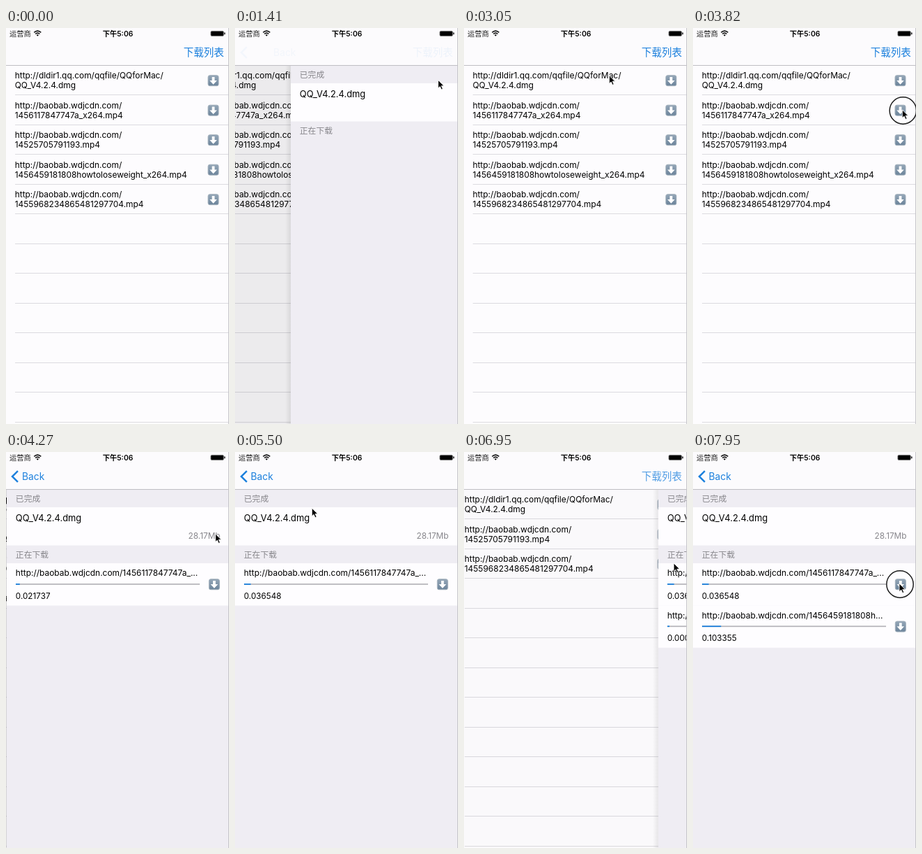
Animation of 320 by 566 pixels, one loop 8 s. Source, as an HTML page:

```html
<!DOCTYPE html>
<html lang="zh">
<head>
<meta charset="utf-8">
<style>
  html, body { margin: 0; width: 100%; height: 100%; overflow: hidden; background: #fdfcfe; }
  svg { display: block; width: 100vw; height: 100vh; }
  text { font-family: Inter, "Noto Sans CJK SC", "Noto Sans CJK", sans-serif; white-space: pre; }
</style>
</head>
<body>
<svg viewBox="0 0 320 566" preserveAspectRatio="none">
  <defs>
    <linearGradient id="shade"><stop offset="0" stop-opacity="0"/><stop offset="1" stop-opacity=".08"/></linearGradient>
    <linearGradient id="key" x2="0" y2="1"><stop offset="0" stop-color="#94a6b7"/><stop offset="1" stop-color="#6c849b"/></linearGradient>
    <g id="icon">
      <rect x="-7.5" y="-7.5" width="15" height="15" rx="2.5" fill="url(#key)" stroke="#a3b0bc" stroke-width="1"/>
      <path d="M-1.9-5.2h3.8v4.9h3.4L0 5.6-5.3-.3h3.4z" fill="#fff"/>
    </g>
  </defs>
  <rect width="320" height="566" fill="#fdfcfe"/>
  <g id="list"></g>
  <rect id="dim" y="53" width="320" height="513"/>
  <g id="page">
    <rect id="shadow" x="-8" y="53" width="8" height="513" fill="url(#shade)"/>
    <rect y="53" width="320" height="513" fill="#efedf3"/>
    <rect y="79" width="320" height="54.5" fill="#fefdff"/>
    <g id="cells"></g>
  </g>
  <rect width="320" height="53" fill="#fcfbfd"/>
  <rect y="53" width="320" height="1" fill="#bfbec3"/>
  <g id="nav" fill="#1c80dd">
    <text id="listButton" x="254.7" y="40.3" font-size="14.5">下载列表</text>
    <path id="chevron" d="M17 27.2 9 35l8 7.8" fill="none" stroke="#1c80dd" stroke-width="2.5"/>
    <text id="back" x="22.6" y="40" font-size="13.8">Back</text>
  </g>
  <g id="status">
    <text x="5" y="11.8" font-size="10.3" fill="#222">运营商</text>
    <g fill="none" stroke="#111" stroke-width="1.5">
      <path d="M40.3 6.4q5-4.6 10 0M42.1 8.5q3.2-2.8 6.4 0"/>
    </g>
    <path d="M43.7 10q1.6-1.4 3.2 0l-1.6 1.8z"/>
    <text x="160.5" y="11.8" font-size="10.3" font-weight="600" text-anchor="middle">下午5:06</text>
    <rect x="293.9" y="4.4" width="18.4" height="7" rx="1.5" fill="#000" stroke="#777" stroke-width=".8"/>
    <rect x="313.2" y="6.3" width="1.3" height="3" rx=".6" fill="#000"/>
  </g>
  <rect x="319" width="1" height="566" fill="#c6c5ca"/>
  <g id="cursor">
    <circle id="tap" cx="1" cy="1" r="19.2" fill="none" stroke="#1c1c1c" stroke-width="1.5"/>
    <path d="M0 0v11.6l2.7-2.5 2 4.4 2-.9-2-4.3h3.7z" fill="#000" stroke="#fff" stroke-width=".8"/>
  </g>
</svg>
<script>
const LOOP = 8000;
const $ = id => document.getElementById(id);
const label = (x, y, text, size = 11.95, extra = '') =>
  `<text x="${x}" y="${y}" font-size="${size}" ${extra}>${text}</text>`;
const icon = (x, y) => `<use href="#icon" x="${x}" y="${y}"/>`;

const host = 'http://baobab.wdjcdn.com/';
const files = [
  ['http://dldir1.qq.com/qqfile/QQforMac/', 'QQ_V4.2.4.dmg'],
  [host, '1456117847747a_x264.mp4'],
  [host, '14525705791193.mp4'],
  [host, '1456459181808howtoloseweight_x264.mp4'],
  [host, '1455968234865481297704.mp4']
];
const downloads = [
  { title: host + '1456117847747a_...', file: 1, start: 3830, steps: [[3830, 0], [4270, .021743], [4960, .036548]] },
  { title: host + '1456459181808h...', file: 3, start: 6910, steps: [[6975, 0], [7950, .103355]] }
];

// [start, 1 = push, 0 = pop]
const moves = [[1258, 1], [2600, 0], [3830, 1], [5960, 0], [6916, 1]];
const taps = [[830, 1180], [2380, 2570], [3640, 3850], [4830, 5050], [5800, 5980], [6700, 6910], [7880, 8000]];
const path = [
  [90, 156, 515], [820, 291, 47], [1180, 291, 47], [1410, 291.5, 74.5], [1700, 293, 76],
  [2350, 19, 37], [2620, 19, 37], [3050, 210.5, 68.5], [3450, 300, 117], [4290, 300.5, 117],
  [4720, 296, 188], [5080, 296, 188], [5500, 109, 79.5], [5770, 15, 31], [6000, 15, 31],
  [6550, 301, 159], [7000, 301, 159], [7700, 296, 188], [8000, 296, 188]
];

function lerpSteps(steps, t) {
  if (t <= steps[0][0]) return steps[0][1];
  for (let i = 1; i < steps.length; i++) {
    const [t0, a] = steps[i - 1], [t1, b] = steps[i];
    if (t < t1) return a + (b - a) * (t - t0) / (t1 - t0);
  }
  return steps[steps.length - 1][1];
}

// Monotone cubic through the keys, so that holds stay still
function follow(keys, t, axis) {
  const slope = i => keys[i] && keys[i + 1]
    ? (keys[i + 1][axis] - keys[i][axis]) / (keys[i + 1][0] - keys[i][0]) : 0;
  const tangent = i => {
    const a = slope(i - 1), b = slope(i);
    return a * b > 0 ? 2 * a * b / (a + b) : 0;
  };
  let i = 0;
  while (i < keys.length - 2 && t >= keys[i + 1][0]) i++;
  const span = keys[i + 1][0] - keys[i][0];
  const u = Math.min(1, Math.max(0, (t - keys[i][0]) / span));
  const s = u * u * (3 - 2 * u), v = 1 - u;
  return keys[i][axis] * (1 - s) + keys[i + 1][axis] * s
    + span * u * v * (v * tangent(i) - u * tangent(i + 1));
}

// 0 = file list, 1 = downloads page
function pagePosition(t) {
  const move = moves.filter(m => t >= m[0]).pop();
  if (!move) return 0;
  const k = (t - move[0]) * .018;
  const p = k > 10 ? 1 : 1 - (1 + k) * Math.exp(-k);
  return move[1] ? p : 1 - p;
}

function listMarkup(active) {
  const taken = active.map(d => d.file);
  let out = '';
  files.filter((_, i) => !taken.includes(i)).forEach(([folder, name], i) => {
    const y = 53.5 + i * 42.5;
    out += label(12.7, y + 18.6, folder) + label(12.7, y + 32.8, name) + icon(297.5, y + 21.7);
  });
  for (let i = 1; i <= 12; i++)
    out += `<rect x="13" y="${Math.floor(53 + i * 42.5)}" width="320" height="1" fill="#dcdbe0"/>`;
  return out;
}

function cellsMarkup(active, t) {
  const grey = 'fill="#88878c"';
  let out = label(12.8, 70.6, '已完成', 11.8, grey) + label(12.8, 150.6, '正在下载', 11.8, grey)
    + label(12.8, 98.6, 'QQ_V4.2.4.dmg', 12.9)
    + label(306.5, 123.8, '28.17Mb', 11.8, grey + ' text-anchor="end"');
  active.forEach((d, i) => {
    const y = 159 + i * 60.3, value = lerpSteps(d.steps, t);
    out += `<rect y="${y}" width="320" height="60.5" fill="#fefdff"/>`
      + label(12.8, y + 18.3, d.title)
      + `<rect x="13" y="${y + 29}" width="264" height="1.8" fill="#b9b8bd"/>`
      + `<rect x="13" y="${y + 29}" width="${Math.max(3, 264 * value)}" height="1.8" fill="#1c80dd"/>`
      + label(12.8, y + 50.5, value.toFixed(6), 11.7) + icon(297.8, y + 30.2);
  });
  return out;
}

let listed = -1;
function render(t) {
  const p = pagePosition(t);
  const active = downloads.filter(d => t >= d.start);
  if (listed !== active.length) {
    $('list').innerHTML = listMarkup(active);
    listed = active.length;
  }
  $('cells').innerHTML = cellsMarkup(active, t);
  $('list').setAttribute('transform', `translate(${-93 * p})`);
  $('dim').setAttribute('opacity', .09 * p);
  $('page').setAttribute('transform', `translate(${320 * (1 - p)})`);
  $('page').style.display = p > 0 ? '' : 'none';
  $('shadow').setAttribute('opacity', Math.min(1, 8 * p));

  const backAlpha = Math.max(0, (p - .74) / .26);
  $('listButton').setAttribute('opacity', (1 - p) ** 2);
  $('chevron').setAttribute('opacity', backAlpha);
  $('back').setAttribute('opacity', backAlpha);
  $('back').setAttribute('transform', `translate(${130 * (1 - p)})`);

  $('cursor').style.display = t < 90 ? 'none' : '';
  $('cursor').setAttribute('transform', `translate(${follow(path, t, 1)} ${follow(path, t, 2)})`);
  $('tap').style.display = taps.some(([a, b]) => t >= a && t < b) ? '' : 'none';
}

const STEP = 7860 / 173;
const start = performance.now();
function tick() {
  const t = (performance.now() - start) % LOOP;
  render(t < 90 ? 0 : 90 + Math.floor((t - 85) / STEP) * STEP);
  requestAnimationFrame(tick);
}
tick();
</script>
</body>
</html>
```
